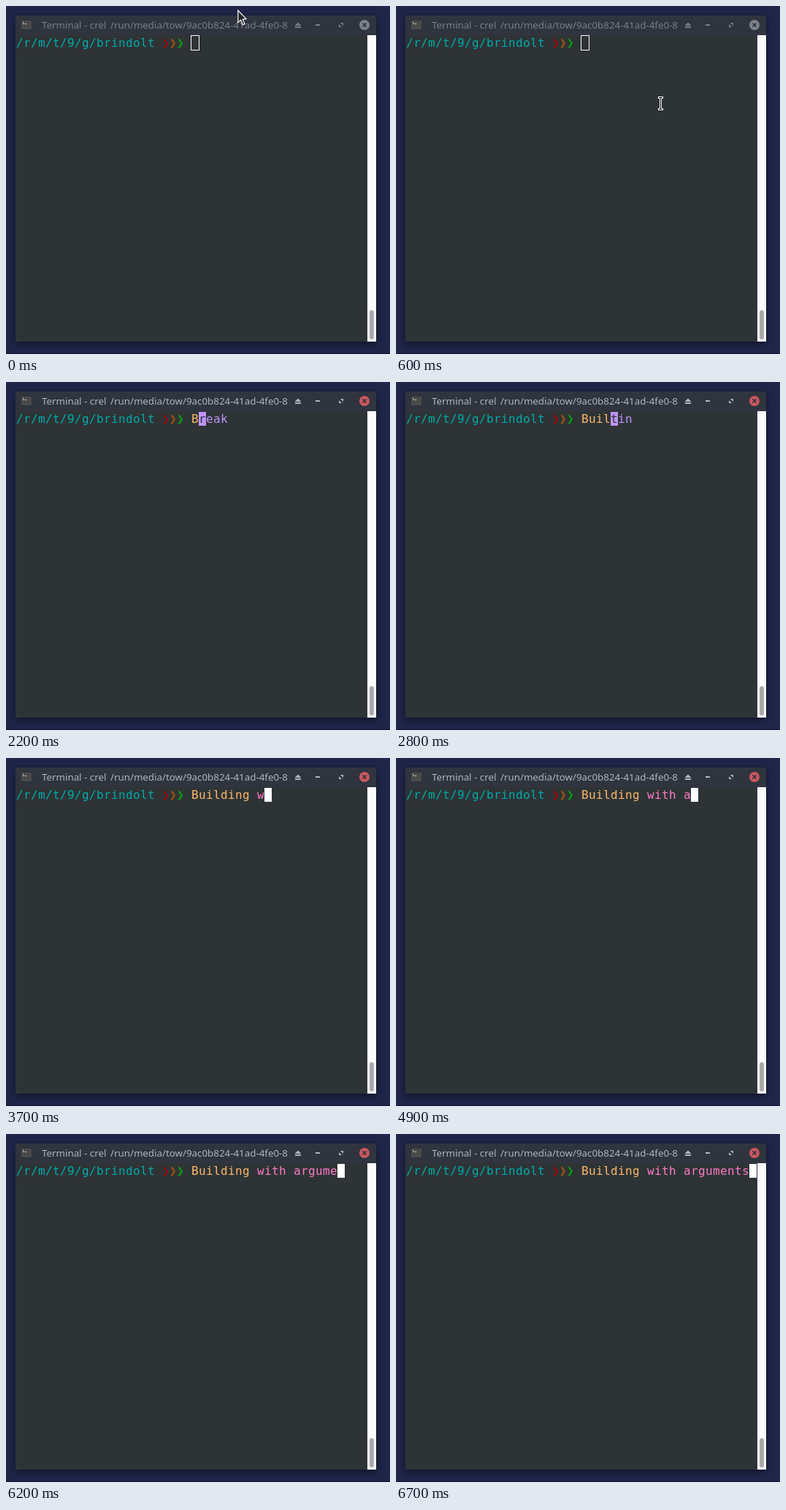
Recreate the animation shown at these times as an HTML page with a canvas. Size 526 px wide and 477 px high, loop 8 s.

```html
<!DOCTYPE html>
<html lang="en">
<head>
<meta charset="utf-8">
<title>Terminal typing</title>
<style>
  html, body { margin: 0; width: 100%; height: 100%; overflow: hidden; background: #20264a; }
  canvas { display: block; }
</style>
</head>
<body>
<canvas id="stage" width="526" height="477"></canvas>
<script>
const ctx = document.getElementById('stage').getContext('2d');
const LOOP = 8000, FOCUS_AT = 800;
const CELL = 10, LEFT = 14, BASE = 56, INPUT_COL = 24;
const MONO = '16px "DejaVu Sans Mono", monospace';
const SANS = '13.333px "Noto Sans", sans-serif';
const C = {
  desk: '#20264a', bar: '#2f343f', term: '#2e3436', fg: '#ffffff',
  cyan: '#00aaaa', red: '#aa0000', brown: '#aa5500', green: '#00aa00',
  command: '#ffb86c', param: '#ff79c6', hint: '#bd93f9'
};

const LINE = 'Building with arguments';
// [time, typed characters, suggested word]
const KEYS = [
  [2200, 1, 'Break'], [2400, 2, 'Builtin'], [2600, 3, 'Builtin'], [2800, 4, 'Builtin'],
  [3000, 5], [3100, 6], [3300, 7], [3400, 9], [3700, 10], [3900, 11], [4000, 12],
  [4200, 14], [4900, 15], [5200, 16], [5400, 17], [5600, 18], [6000, 19],
  [6200, 20], [6300, 21], [6400, 22], [6700, 23]
];
// [time, x, y, shape]
const POINTER = [
  [0, 317, 5, arrow], [300, 325, 15, arrow], [400, 350, 58, beam],
  [500, 367, 108, beam], [600, 359, 124, beam], [1100, 0, 0, null]
];

const latest = (list, t) => list.filter(step => step[0] <= t).pop();

function rect(x, y, w, h, color) {
  ctx.fillStyle = color;
  ctx.fillRect(x, y, w, h);
}

function box(x, y, w, h, radius, color) {
  ctx.fillStyle = color;
  ctx.beginPath();
  ctx.roundRect(x, y, w, h, radius);
  ctx.fill();
}

function poly(points, color) {
  ctx.fillStyle = color;
  ctx.beginPath();
  points.forEach(([x, y]) => ctx.lineTo(x, y));
  ctx.closePath();
  ctx.fill();
}

function line(x1, y1, x2, y2, color, width) {
  ctx.strokeStyle = color;
  ctx.lineWidth = width;
  ctx.beginPath();
  ctx.moveTo(x1, y1);
  ctx.lineTo(x2, y2);
  ctx.stroke();
}

function label(text, x, y, font, color) {
  ctx.font = font;
  ctx.fillStyle = color;
  ctx.fillText(text, x, y);
}

// Each glyph sits in its own terminal cell.
function cells(text, col, color) {
  [...text].forEach((ch, i) => label(ch, LEFT + (col + i) * CELL, BASE, MONO, color));
}

function drawWindow() {
  rect(0, 0, 526, 477, C.desk);
  ctx.save();
  ctx.shadowColor = 'rgba(0,0,0,.5)';
  ctx.shadowBlur = 12;
  ctx.shadowOffsetY = 3;
  box(13, 13, 494, 447, [3, 3, 0, 0], C.bar);
  ctx.restore();
  rect(0, 476, 526, 1, '#14172c');
  rect(13, 40, 482, 420, C.term);
  rect(495, 40, 12, 420, '#fcfcfc');
  box(498, 417, 6, 40, 3, '#a9a9ae');
}

function drawTitle(focused) {
  const color = focused ? '#afb5c0' : '#787d88';
  rect(21, 20, 14, 12, '#4a4a48');
  line(23, 22, 24.5, 23.5, '#eeeeee', 1);
  line(24.5, 23.5, 23, 25, '#eeeeee', 1);
  rect(26, 24, 2, 1, '#eeeeee');

  label('Terminal - crel', 49, 31, SANS, color);
  label('/run/media/tow/9ac0b824-41ad-4fe0-8', 143, 31, SANS, color);

  poly([[400, 22.5], [404.5, 27], [395.5, 27]], color);
  rect(396, 28, 8, 2, color);
  rect(424, 25, 6, 2, color);
  poly([[458, 23], [462, 23], [462, 27]], color);
  poly([[456, 25], [460, 29], [456, 29]], color);

  box(484, 19, 14, 14, 7, focused ? '#cc575d' : '#7d828c');
  line(488.5, 23.5, 493.5, 28.5, C.bar, 1.7);
  line(493.5, 23.5, 488.5, 28.5, C.bar, 1.7);
}

function drawPrompt(t, focused) {
  cells('/r/m/t/9/g/brindolt', 0, C.cyan);
  [C.red, C.brown, C.green].forEach((color, i) => cells('❯', 20 + i, color));

  const [, count, hint = ''] = latest(KEYS, t) || [0, 0];
  const typed = LINE.slice(0, count), rest = hint.slice(count);
  const col = INPUT_COL + count, x = LEFT + col * CELL;
  cells(typed.slice(0, 8), INPUT_COL, C.command);
  cells(typed.slice(8), INPUT_COL + 8, C.param);
  cells(rest, col, C.hint);

  if (focused) {
    rect(x, 41, CELL, 19, rest ? C.hint : C.fg);
    cells(rest.slice(0, 1), col, C.term);
  } else {
    ctx.strokeStyle = C.fg;
    ctx.lineWidth = 1;
    ctx.strokeRect(x - .5, 40.5, 11, 20);
  }
}

function arrow() {
  ctx.beginPath();
  [[.8, 1], [.8, 17.5], [4.6, 14.2], [7.3, 20.8], [10, 19.6], [7.3, 13.2], [12, 12.7]]
    .forEach(([x, y]) => ctx.lineTo(x, y));
  ctx.closePath();
  ctx.fillStyle = '#24272c';
  ctx.fill();
  ctx.strokeStyle = '#ffffff';
  ctx.lineWidth = 1.2;
  ctx.stroke();
}

function beam() {
  const bars = [[0, 0, 7, 3], [2, 0, 3, 19], [0, 16, 7, 3]];
  bars.forEach(([x, y, w, h]) => rect(x, y, w, h, '#ffffff'));
  bars.forEach(([x, y, w, h]) => rect(x + 1, y + 1, w - 2, h - 2, '#101010'));
}

function drawPointer(t) {
  const [, x, y, shape] = latest(POINTER, t);
  if (!shape) return;
  ctx.save();
  ctx.translate(x, y);
  shape();
  ctx.restore();
}

function frame() {
  const t = performance.now() % LOOP, focused = t >= FOCUS_AT;
  drawWindow();
  drawTitle(focused);
  drawPrompt(t, focused);
  drawPointer(t);
  requestAnimationFrame(frame);
}
frame();
</script>
</body>
</html>
```
